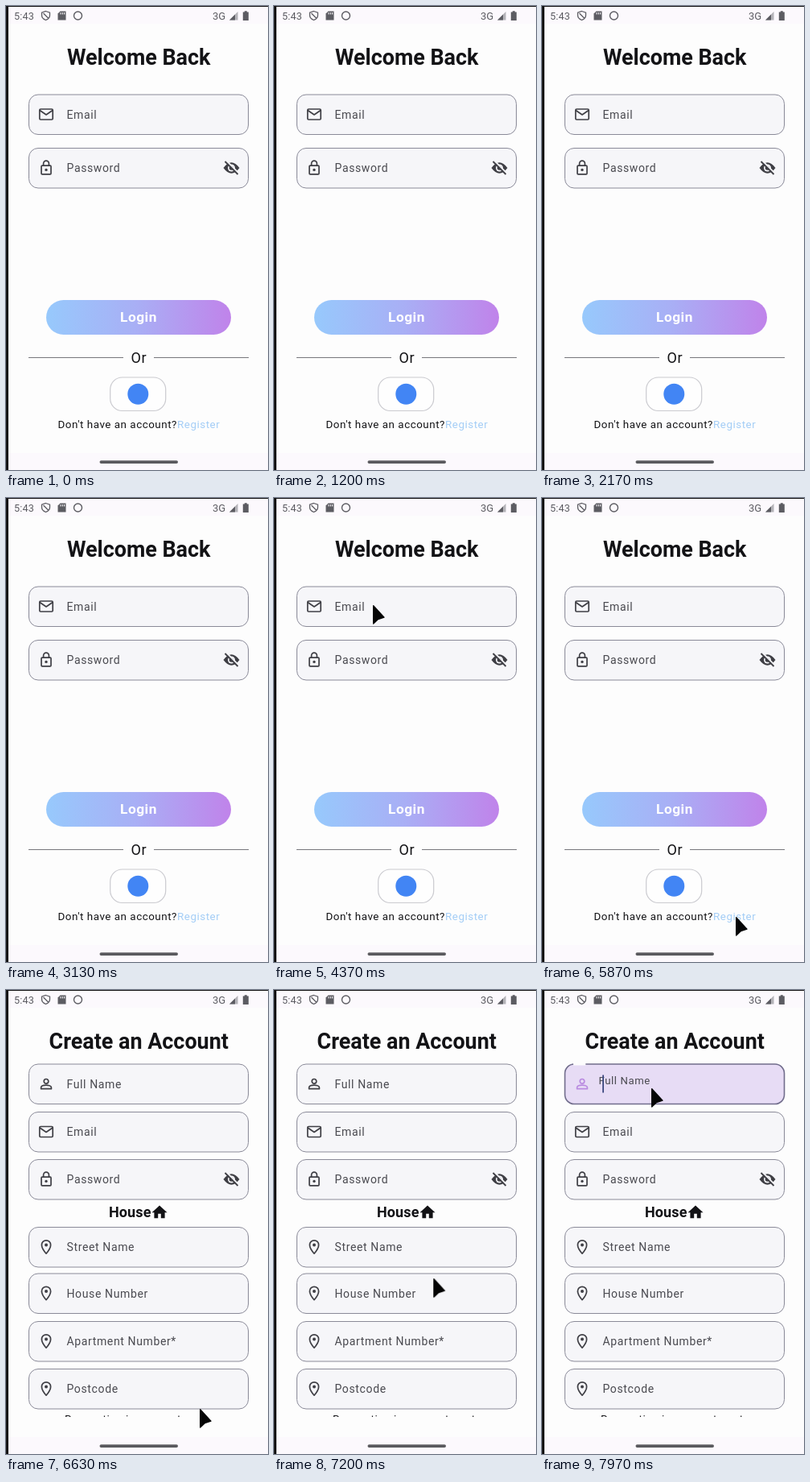
Animation, 326 px wide and 576 px high, one loop 8 s. Source, as an HTML page:

```html
<!DOCTYPE html>
<html lang="en">
<head>
<meta charset="utf-8">
<title>Login and registration</title>
<style>
  :root { --bg: #fdfdfd; --bar: #fcf9fd; --field: #f6f6f9; --ink: #131316; --soft: #4a4a50; --line: #8a8a98; --icon: #3f3f45; }
  html, body { margin: 0; width: 100%; height: 100%; overflow: hidden; background: var(--bg); }
  svg { display: block; width: 326px; height: 576px; font-family: Roboto, sans-serif; fill: var(--ink); }
  .paper { fill: var(--bg); }
  .bar { fill: var(--bar); }
  .title { font-size: 26.9px; font-weight: 700; text-anchor: middle; }
  .mid { text-anchor: middle; }
  .box { fill: var(--field); stroke: var(--line); stroke-width: 1; }
  .label { font-size: 14px; letter-spacing: .63px; fill: var(--soft); }
  .icon { color: var(--icon); }
  .outline { fill: none; stroke: currentColor; stroke-width: 1.7; stroke-linejoin: round; }
  .solid { fill: currentColor; }
  .small { font-size: 13.4px; letter-spacing: .52px; }
  .status { color: #5c5c62; fill: currentColor; font-size: 12.6px; }

  .page, .cursor, .active *, .caret, .gap { animation: 8s linear infinite; }
  .page { transform-origin: 164px 288px; }
  #login { animation-name: leave; }
  #register { animation-name: enter; }
  .cursor { fill: #050505; stroke: #050505; stroke-width: 1.4; stroke-linejoin: round; animation-name: point; }
  .active .box { animation-name: box-focus; }
  .active .icon { animation-name: icon-focus; }
  .active .label { animation-name: float; transform-origin: 76px 117px; }
  .caret { fill: #3c4a80; animation-name: show; }
  .gap { fill: var(--bg); transform-origin: 39px 92px; animation-name: open; }

  @keyframes leave {
    0%, 74.375% { transform: none; animation-timing-function: cubic-bezier(.2, 0, 0, 1); }
    78.125%, 100% { transform: scale(1.05); }
  }
  @keyframes enter {
    0%, 74.375% { transform: scale(.85); opacity: 0; animation-timing-function: cubic-bezier(.2, 0, 0, 1); }
    78.125%, 100% { transform: none; opacity: 1; }
  }
  @keyframes point {
    0%, 46.25% { transform: translate(-20px, 20px); animation-timing-function: ease-out; }
    52.125%, 57.125% { transform: translate(123px, 133px); animation-timing-function: ease-in-out; }
    70.125%, 85% { transform: translate(241px, 520px); animation-timing-function: ease-in-out; }
    96.25%, 100% { transform: translate(136px, 122px); }
  }
  @keyframes box-focus {
    0%, 99.06% { fill: var(--field); stroke: var(--line); stroke-width: 1; }
    99.2%, 100% { fill: #e7dcf5; stroke: #716d8c; stroke-width: 1.6; }
  }
  @keyframes icon-focus {
    0%, 99.06% { color: var(--icon); }
    99.2%, 100% { color: #b98ae0; }
  }
  @keyframes float {
    0%, 99.06% { transform: none; animation-timing-function: cubic-bezier(.4, 0, 1, 1); }
    100% { transform: translate(-11px, -9px) scale(.87); }
  }
  @keyframes open {
    0%, 99.06% { transform: scaleX(0); animation-timing-function: cubic-bezier(.4, 0, 1, 1); }
    100% { transform: none; }
  }
  @keyframes show {
    0%, 99.06% { opacity: 0; }
    99.07%, 100% { opacity: 1; }
  }
</style>
</head>
<body>
<svg viewBox="0 0 326 576">
  <defs>
    <linearGradient id="sky">
      <stop offset="0" stop-color="#97c9fc"/>
      <stop offset=".5" stop-color="#a9aef5"/>
      <stop offset="1" stop-color="#c083ea"/>
    </linearGradient>
    <clipPath id="scroll"><rect width="326" height="530"/></clipPath>
    <g id="mail" class="outline">
      <rect x="-8.2" y="-6.5" width="16.4" height="13" rx="1.3"/><path d="M-8-5L0 .5L8-5"/>
    </g>
    <g id="lock">
      <g class="outline"><rect x="-6" y="-2.8" width="12" height="10.6" rx="1"/><path d="M-3.4-3V-5.5a3.4 3.4 0 0 1 6.8 0V-3"/></g>
      <circle class="solid" cy="2.4" r="1.7"/>
    </g>
    <g id="user" class="outline">
      <circle cy="-3.2" r="2.8"/><path d="M-6.4 6.2V4.6C-6.4 2.4-2.4 1.6 0 1.6S6.4 2.4 6.4 4.6V6.2Z"/>
    </g>
    <g id="pin">
      <path class="outline" d="M0 8.2C-4 3.5-5.6 .6-5.6-2.6a5.6 5.6 0 0 1 11.2 0C5.6 .6 4 3.5 0 8.2Z"/>
      <circle class="solid" cy="-2.5" r="2"/>
    </g>
    <g id="hidden">
      <path class="solid" d="M-10 0Q0-13.5 10 0Q0 13.5-10 0Z"/>
      <circle r="4.5" fill="var(--field)"/><circle class="solid" r="2.8"/>
      <path d="M-6.5-9L9.5 7" stroke="var(--field)" stroke-width="2"/>
      <path d="M-8-8L8 8" stroke="currentColor" stroke-width="1.8"/>
    </g>
    <g id="bars">
      <rect class="bar" width="326" height="22"/><rect class="bar" y="555" width="326" height="21"/>
    </g>
  </defs>

  <rect class="paper" width="326" height="576"/>

  <g id="login" class="page">
    <text class="title" x="165.2" y="73.3">Welcome Back</text>
    <g id="login-fields"></g>
    <rect x="50" y="365" width="230" height="43" rx="21.5" fill="url(#sky)"/>
    <text class="mid" x="165" y="392" font-size="17.3" font-weight="700" letter-spacing=".5" fill="#fff">Login</text>
    <path d="M28 436.5H146M184 436.5H302" stroke="#77777c"/>
    <text class="mid" x="165.3" y="442.7" font-size="18" letter-spacing=".5">Or</text>
    <rect x="129.7" y="461" width="69" height="41.5" rx="15" fill="#fefefe" stroke="#cbcbd0" stroke-width="1.2"/>
    <circle cx="164.3" cy="481.7" r="13" fill="#4285f4"/>
    <text class="small" x="64.5" y="524">Don't have an account?</text>
    <text class="small" x="213" y="524" fill="#a3cdf6">Register</text>
  </g>

  <g id="register" class="page">
    <rect class="paper" width="326" height="576"/>
    <text class="title" x="165.2" y="73.3">Create an Account</text>
    <g id="register-fields"></g>
    <rect class="gap" x="39" y="90.5" width="34" height="3"/>
    <rect class="caret" x="75.2" y="105.5" width="1.8" height="22"/>
    <text x="128" y="282" font-size="18" font-weight="700" letter-spacing=".1">House</text>
    <path transform="translate(191 275.5)" d="M-9.5 .7L0-8L9.5 .7H6.6V7.7H1.8V2.2H-1.8V7.7H-6.6V.7Z"/>
    <g clip-path="url(#scroll)"><text class="small" x="73" y="537">Requesting in an apartment</text></g>
  </g>

  <use href="#bars"/>
  <g class="status">
    <text x="10" y="16.8" letter-spacing=".2">5:43</text>
    <path d="M49.5 6.5L54.5 8.2V11.5Q54.5 15.5 49.5 17.5Q44.5 15.5 44.5 11.5V8.2ZM46.5 9L53 15.5" fill="none" stroke="currentColor" stroke-width="1.3"/>
    <path d="M67.5 6.5H74.5V17.5H64.5V9.5Z"/>
    <path d="M68 8V10.5M70.3 8V10.5M72.6 8V10.5" stroke="var(--bar)"/>
    <circle cx="89.5" cy="12" r="5" fill="none" stroke="currentColor" stroke-width="1.4"/>
    <text x="257" y="16.8" font-size="13">3G</text>
    <path d="M278 17.5L288.5 7V17.5Z" opacity=".45"/><path d="M278 17.5L285 10.5V17.5Z"/>
    <path d="M296.8 6.2H299.8V7.5H301.8V18H294.8V7.5H296.8Z"/>
  </g>
  <rect x="116.5" y="564.2" width="97.5" height="3.8" rx="1.9" fill="#5a5a5e"/>
  <path d="M0 0H326V1H3V576H0Z" fill="#141414"/>

  <path class="cursor" d="M.7 .7V23L6.5 17.6L14 15.2Z"/>
</svg>
<script>
  const field = ([icon, label, top, active]) => {
    const mid = top + 25;
    const eye = icon === 'lock' ? `<use href="#hidden" class="icon" x="280.5" y="${mid}"/>` : '';
    return `<g class="${active ? 'active' : ''}">
      <rect class="box" x="28.5" y="${top + .5}" width="273" height="49.5" rx="11.5"/>
      <use href="#${icon}" class="icon" x="50" y="${mid}"/>${eye}
      <text class="label" x="75.5" y="${mid + 5.2}">${label}</text></g>`;
  };
  const fill = (id, fields) => {
    document.getElementById(id).innerHTML = fields.map(field).join('');
  };
  fill('login-fields', [['mail', 'Email', 109.5], ['lock', 'Password', 176]]);
  fill('register-fields', [
    ['user', 'Full Name', 91.5, true],
    ['mail', 'Email', 151],
    ['lock', 'Password', 210],
    ['pin', 'Street Name', 294],
    ['pin', 'House Number', 351.5],
    ['pin', 'Apartment Number*', 411],
    ['pin', 'Postcode', 470]
  ]);
</script>
</body>
</html>
```
